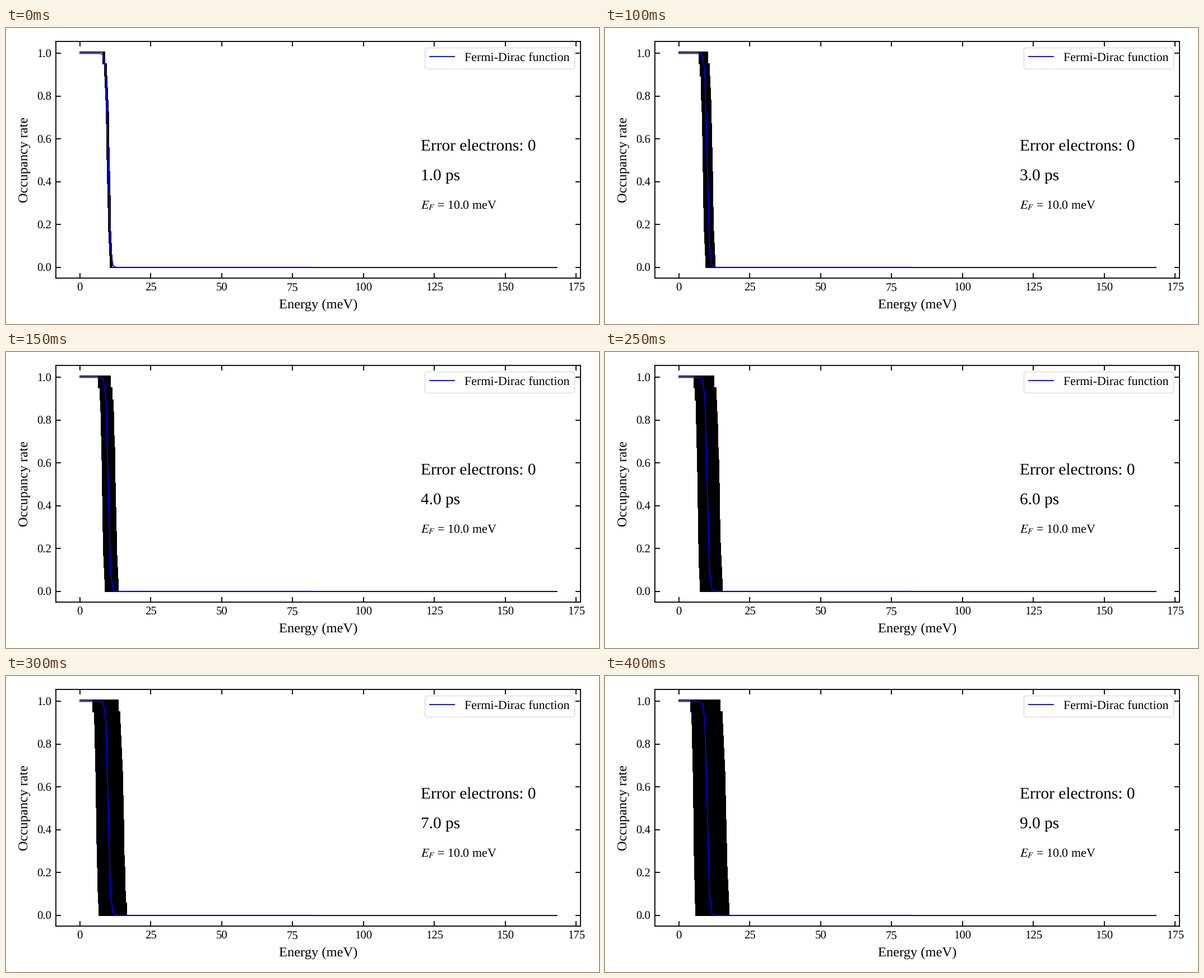
Write a matplotlib script that moves like this. It is 1058 px wide and 529 px high and loops after 450 ms.

```python
import numpy as np
import matplotlib.pyplot as plt
from matplotlib.animation import FuncAnimation
from matplotlib.patches import Polygon

W, H, DPI = 1058, 529, 100
FRAMES, INTERVAL = 9, 50
LEFT, RIGHT, TOP, BOTTOM = 89.2, 1025.1, 23.8, 447
E_MAX, F_MAX = 168.1, 1.0063
STEPS, SKEW = 18, 0.2
FERMI, KT = 10.0, 0.362


def pt(px):
    """Pixels to points."""
    return px * 72 / DPI


LINE = pt(1.84)
plt.rcParams.update({
    "font.family": "Liberation Serif",
    "mathtext.fontset": "stix",
    "text.hinting": "no_hinting",
    "axes.linewidth": LINE,
    "patch.linewidth": pt(1.22),
})

fig = plt.figure(figsize=(W / 100, H / 100), dpi=DPI, facecolor="white")
ax = fig.add_axes([LEFT / W, 1 - BOTTOM / H, (RIGHT - LEFT) / W, (BOTTOM - TOP) / H])
ax.set_xlim(-0.05 * E_MAX, 1.05 * E_MAX)
ax.set_ylim(-0.05 * F_MAX, 1.05 * F_MAX)
ax.set_xticks(range(0, 176, 25))
ax.set_yticks(np.arange(6) / 5)
ax.tick_params(direction="in", top=True, right=True, length=pt(9), width=LINE,
               pad=pt(7.8), labelsize=pt(20.8))
ax.set_xlabel("Energy (meV)", fontsize=pt(24.5), labelpad=pt(10.6))
ax.set_ylabel("Occupancy rate", fontsize=pt(24.5), labelpad=pt(10.6))

# Occupied levels: a band between two staircases, plus its flat ends
outline, = ax.plot([], [], color="black", lw=LINE, zorder=2)
band = Polygon([[0, 0], [1, 0], [1, 1]], facecolor="black", edgecolor="black",
               lw=LINE, joinstyle="round", zorder=2)
ax.add_patch(band)

energy = np.linspace(0, 82.3, 100)
ax.plot(energy, 1 / (1 + np.exp((energy - FERMI) / KT)), color="blue", lw=LINE,
        zorder=3, label="Fermi-Dirac function")
ax.legend(loc="upper right", fontsize=pt(22.04))


def note(y, text, size):
    return ax.text(120.15, y, text, fontsize=pt(size), va="baseline")


note(0.546, "Error electrons: 0", 29.4)
clock = note(0.409, "", 29.4)
note(0.273, "$E_F$ = 10.0 meV", 22.04)


def staircase(centre, reach):
    """Skewed Fermi-like descent from full to empty in equal steps."""
    f = (np.arange(STEPS, 0, -1) - 0.5) / STEPS
    u = np.log(1 / f - 1) / np.log(2 * STEPS - 1)
    x = centre + reach * (u + SKEW * (1 - u ** 2))
    y = F_MAX * np.arange(STEPS, -1, -1) / STEPS
    return np.column_stack([np.repeat(x, 2), np.repeat(y, 2)[1:-1]])


def update(i):
    t = i + 1
    knots = [1, 2, 4, 6, 7, 9]
    low = np.interp(t, knots, [9.41, 8.92, 7.74, 6.49, 5.70, 5.07])
    high = np.interp(t, knots, [10.09, 10.68, 12.16, 13.84, 14.92, 16.11])
    inner = staircase(low, 1.30 - 0.044 * i)
    outer = staircase(high, 1.28 + 0.04 * i)
    band.set_xy(np.vstack([inner, outer[::-1]]))
    outline.set_data(*np.vstack([[0, F_MAX], outer, [E_MAX, 0]]).T)
    clock.set_text(f"{t:.1f} ps")
    return band, outline, clock


anim = FuncAnimation(fig, update, frames=FRAMES, interval=INTERVAL,
                     repeat=True, repeat_delay=0, blit=False)
plt.show()
```
